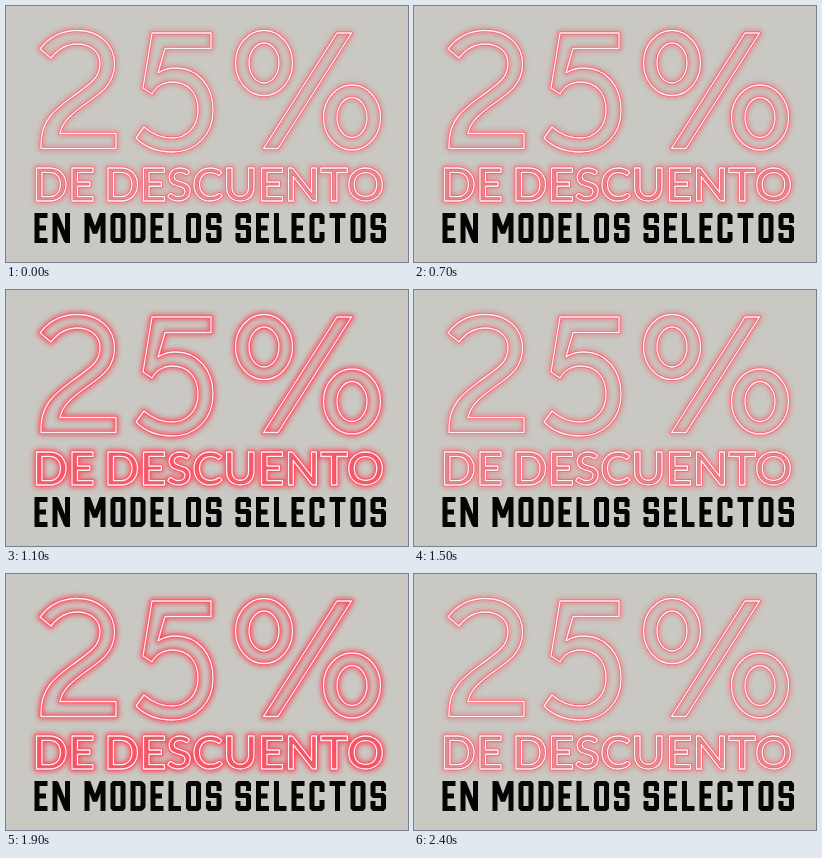
Recreate the animation shown at these times as an HTML page. Size 402 by 256 pixels, loop 2.5 s.

```html
<!DOCTYPE html>
<html lang="es">
<head>
<meta charset="utf-8">
<title>25% de descuento</title>
<style>
  html, body { margin: 0; width: 100%; height: 100%; overflow: hidden; background: #c9c8c2; }
  svg { display: block; width: 402px; height: 256px; }
  text { font-family: Lato, "Open Sans", sans-serif; font-weight: 600; }
  use { fill: none; stroke-linejoin: round; }
  .halo { stroke: #ff3a50; stroke-width: 5.5; filter: url(#blur); animation: halo 2.5s infinite; }
  .tube { stroke: #ff4a60; stroke-width: 2.8; animation: tube 2.5s infinite; }
  .core { stroke: #fff2f2; stroke-width: 1.3; }
  #tagline { fill: none; stroke: #050505; stroke-width: 5; stroke-linejoin: bevel; }

  /* three pulses, advancing every 100 ms */
  @keyframes halo {
    0% { opacity: .42; animation-timing-function: steps(3); }
    12% { opacity: .88; animation-timing-function: steps(4); }
    28% { opacity: .47; animation-timing-function: steps(4); }
    44% { opacity: .8; animation-timing-function: steps(4); }
    60% { opacity: .45; animation-timing-function: steps(4); }
    76% { opacity: .84; animation-timing-function: steps(5); }
    96%, 100% { opacity: .42; }
  }
  @keyframes tube {
    0% { opacity: .72; animation-timing-function: steps(3); }
    12% { opacity: .9; animation-timing-function: steps(4); }
    28% { opacity: .76; animation-timing-function: steps(4); }
    44% { opacity: .88; animation-timing-function: steps(4); }
    60% { opacity: .74; animation-timing-function: steps(4); }
    76% { opacity: .89; animation-timing-function: steps(5); }
    96%, 100% { opacity: .72; }
  }
</style>
</head>
<body>
<svg viewBox="0 0 402 256">
  <defs>
    <filter id="blur" filterUnits="userSpaceOnUse" x="0" y="0" width="402" height="256">
      <feGaussianBlur stdDeviation="2.9"/>
    </filter>
    <g id="sign">
      <g role="img" aria-label="25%">
        <path d="M34 43C43 31 55 24.5 71 24.5C93 24.5 108.5 38 108.5 58C108.5 76 98 85 82 96
                 C65 108 56 116 54 127.5H110V142.5H35V138C35 115 48 104 66 91
                 C84 78 94 72 94 58C94 46 85 38 71 38C60 38 52 43 45 52Z"/>
        <path d="M146 27H205V42.5H159L152 67C157 63.5 163 62 170 62C192 62 207 80 207 104
                 C207 129 190 146 166 146C151 146 139 141 130 132L138 121C146 128 154 132 166 132
                 C181 132 192 121 192 104C192 87 182 76 166 76C158 76 150 80 146 88L137 82Z"/>
        <ellipse cx="258" cy="57" rx="28.5" ry="32.5"/>
        <ellipse cx="258" cy="57" rx="15" ry="20"/>
        <ellipse cx="346" cy="111.5" rx="28.5" ry="32.5"/>
        <ellipse cx="346" cy="111.5" rx="15" ry="20"/>
        <path d="M331 27H345.5L272 142.5H257.5Z"/>
      </g>
      <g id="label" font-size="46">
        <text data-left="30.5" y="194.5">DE</text>
        <text data-left="102" y="194.5">DESCUENTO</text>
      </g>
    </g>
  </defs>
  <use href="#sign" class="halo"/>
  <use href="#sign" class="tube"/>
  <use href="#sign" class="core"/>
  <g id="tagline" role="img" aria-label="EN MODELOS SELECTOS"></g>
</svg>
<script>
  const pen = document.createElement('canvas').getContext('2d');

  // Ink bounds relative to the text origin, per pixel of font size.
  function ink(str) {
    pen.font = '600 200px Lato, "Open Sans", sans-serif';
    const m = pen.measureText(str);
    return { left: -m.actualBoundingBoxLeft / 200, right: m.actualBoundingBoxRight / 200 };
  }

  const word = ink('DESCUENTO');
  const size = 274.5 / (word.right - word.left);
  document.getElementById('label').setAttribute('font-size', size.toFixed(2));

  for (const el of document.querySelectorAll('text')) {
    el.setAttribute('x', el.dataset.left - ink(el.textContent).left * size);
  }

  // Block capitals, 30 high: [width, centre line].
  const caps = {
    E: [13, 'M0 2.5H13M2.5 0V30M0 27.5H13M2 15H11.5'],
    N: [17.5, 'M2.5 0V30M15 0V30M3.5 2L14 28'],
    M: [21, 'M2.5 0V30M18.5 0V30M3.5 1L10.5 20L17.5 1'],
    O: [15, 'M2.5 2.5H12.5V27.5H2.5Z'],
    D: [15, 'M2.5 0V30M0 2.5H10.5L12.5 4.5V25.5L10.5 27.5H0'],
    L: [12.5, 'M2.5 0V30M0 27.5H12.5'],
    S: [15.5, 'M13 10V2.5H2.5V14.5H13V27.5H2.5V20'],
    C: [15, 'M12.5 11V2.5H2.5V27.5H12.5V19'],
    T: [16, 'M0 2.5H16M8 0V30']
  };

  function setWord(str, x) {
    return [...str].map(ch => {
      const [width, d] = caps[ch];
      const path = `<path transform="translate(${x} 207)" d="${d}"/>`;
      x += width + 5;
      return path;
    }).join('');
  }

  document.getElementById('tagline').innerHTML =
    setWord('EN', 28.5) + setWord('MODELOS', 78.5) + setWord('SELECTOS', 229.5);
</script>
</body>
</html>
```
